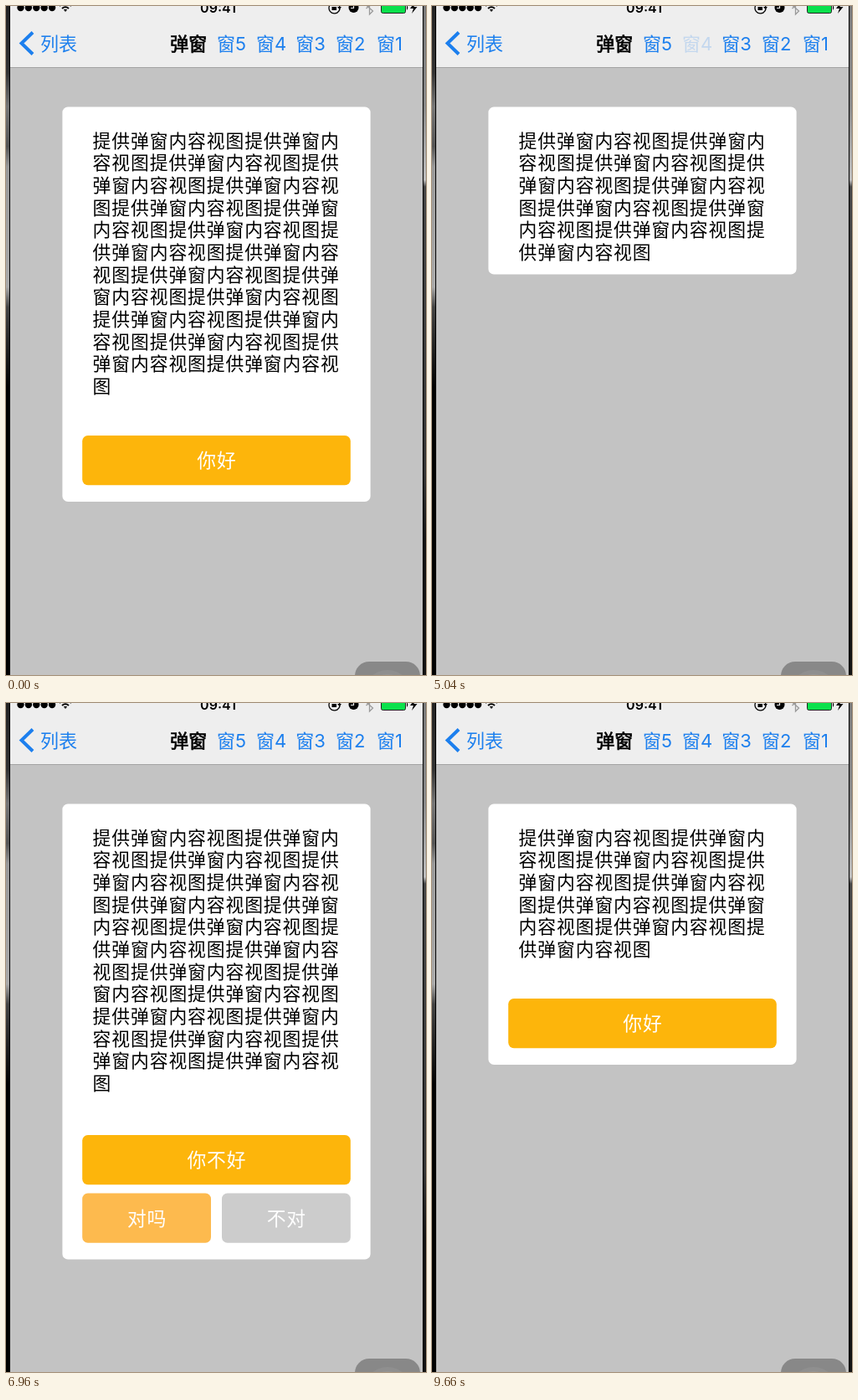
These frames come from a looping animation (502x799 px, 9720 ms). An HTML page:

```html
<!DOCTYPE html>
<html lang="zh-CN">
<head>
<meta charset="utf-8">
<style>
  html, body { margin: 0; width: 100%; height: 100%; overflow: hidden; background: #000; }
  svg { display: block; width: 502px; height: 799px; }
  text { font-family: Inter, 'Noto Sans CJK SC', 'Noto Sans CJK', sans-serif; font-size: 22px; white-space: pre; }
  .body { font-size: 21.8px; letter-spacing: .9px; }
  .label { font-size: 22.8px; letter-spacing: .8px; fill: #fff; text-anchor: middle; }
  .title { stroke: #000; stroke-width: .7px; }
  .blue { fill: #1c7fee; }
</style>
</head>
<body>
<svg viewBox="0 0 502 799">
  <defs>
    <linearGradient id="left" x2="0" y2="1">
      <stop offset="0" stop-color="#222"/><stop offset=".1" stop-color="#333"/>
      <stop offset=".15" stop-color="#777"/><stop offset=".21" stop-color="#555"/>
      <stop offset=".24" stop-color="#999"/><stop offset=".42" stop-color="#aaa"/>
      <stop offset=".45" stop-color="#444"/><stop offset=".54" stop-color="#111"/>
      <stop offset=".57" stop-color="#000"/>
    </linearGradient>
    <linearGradient id="right" x2="0" y2="1">
      <stop offset="0" stop-color="#777"/><stop offset=".15" stop-color="#888"/>
      <stop offset=".26" stop-color="#bbb"/><stop offset=".27" stop-color="#444"/>
      <stop offset=".7" stop-color="#333"/><stop offset=".8" stop-color="#111"/>
    </linearGradient>
  </defs>
  <rect width="4" height="799" fill="url(#left)"/>
  <rect x="499" width="3" height="799" fill="url(#right)"/>
  <rect x="5" width="493" height="799" fill="#c3c3c3"/>
  <rect x="5" width="493" height="73" fill="#eee"/>
  <rect x="5" y="73" width="493" height="1" fill="#a3a3a3"/>

  <path d="M17.5 2H56" stroke="#000" stroke-width="8.4" stroke-linecap="round" stroke-dasharray="0 9.4"/>
  <g fill="none" stroke="#000" stroke-width="2">
    <path d="M64 0Q71-6 78 0M67 3Q71-.5 75 3"/>
    <path d="M71 6.5l-1.5-2h3z" stroke-width="1"/>
    <path d="M398.5 0A6.5 6.5 0 1 1 396-3" stroke-width="1.3"/>
    <path d="M430.5-1l8 7-4 4V-8l4 4-8 7" stroke="#999" stroke-width="1.3"/>
  </g>
  <rect x="389.5" y="1" width="5.5" height="4"/>
  <path d="M396 1h5l-2.5 3z"/>
  <circle cx="415.5" cy="2" r="6"/>
  <path d="M415.5-2V2.5H412" fill="none" stroke="#eee" stroke-width="1.2"/>
  <rect x="448.5" y="-6" width="29" height="14.5" rx="2" fill="#0be14c" stroke="#222"/>
  <path d="M479-1q2.5 3 0 6z"/>
  <path d="M489-5l-6 8h4l-2 6 6.5-8h-4z"/>
  <text x="253.5" y="8" text-anchor="middle" style="font-size:16px;font-weight:600">09:41</text>

  <path d="M32 31.5L18.5 44.5L32 57.5" fill="none" stroke="#1c7fee" stroke-width="4"/>
  <text class="blue" x="41" y="52.7">列表</text>
  <text class="title" x="196.3" y="52.7">弹窗</text>
  <g id="tabs"></g>
  <g id="popups"></g>

  <rect x="417" y="783" width="78" height="78" rx="17" fill="#000" fill-opacity=".3"/>
  <g fill="#fff" fill-opacity=".06">
    <circle cx="456" cy="822" r="29"/><circle cx="456" cy="822" r="24"/>
  </g>
</svg>
<script>
const LOOP = 9720, STEP = 60, RISE = 500, FADE = 450, PRESS = 110;
const REST = 120.5, BELOW = 799;
const ORANGE = '#fdb50b', PALE = '#fdba4e', GRAY = '#ccc';
const phrase = '提供弹窗内容视图';

const make = (parent, tag, attrs, text = '') => {
  const el = document.createElementNS('http://www.w3.org/2000/svg', tag);
  for (const name in attrs) el.setAttribute(name, attrs[name]);
  el.textContent = text;
  return parent.appendChild(el);
};

function button(g, x, y, width, fill, label) {
  make(g, 'rect', { x, y, width, height: 59.2, rx: 6.6, fill });
  make(g, 'text', { class: 'label', x: x + width / 2 + 0.4, y: y + 38.2 }, label);
}
const wide = (g, y, label) => button(g, 91.2, y, 320.6, ORANGE, label);
function pair(g, y, fill, yes, no) {
  button(g, 91.2, y, 153.8, fill, yes);
  button(g, 258, y, 153.8, GRAY, no);
}

function popup(height, repeats, addButtons) {
  const g = make(document.getElementById('popups'), 'g', {});
  make(g, 'rect', { x: 67.4, width: 368.2, height, rx: 6.6, fill: '#fff' });
  if (repeats === 1) {
    make(g, 'text', { class: 'body', x: 251.5, y: 47.5, 'text-anchor': 'middle' }, phrase);
  } else {
    phrase.repeat(repeats).match(/.{1,13}/g).forEach((line, i) =>
      make(g, 'text', { class: 'body', x: 103.6, y: 48.2 + i * 26.65 }, line));
  }
  addButtons(g);
  return g;
}

const popups = {
  5: popup(200, 9, () => {}),
  4: popup(471.5, 18, g => wide(g, 392.5, '你好')),
  3: popup(544, 18, g => { wide(g, 395.5, '你不好'); pair(g, 465, PALE, '对吗', '不对'); }),
  2: popup(242.5, 1, g => pair(g, 164, ORANGE, '确定', '取消')),
  1: popup(311.5, 9, g => wide(g, 232.5, '你好')),
};

const tabs = {};
[443, 394, 346.3, 299, 252].forEach((x, i) => {
  tabs[i + 1] = make(document.getElementById('tabs'), 'text', { class: 'blue', x, y: 52.7 }, '窗' + (i + 1));
});

// Each tap: release time, tab, popup it brings in (0 only clears)
const taps = [
  [1640, 5, 0], [3441, 5, 5], [5110, 4, 4], [6146, 3, 3], [7280, 2, 2], [8735, 1, 1],
];
const smooth = p => p * p * (3 - 2 * p);

function draw(t) {
  let shown = 4, since = -RISE;
  const alpha = {};
  for (const [at, tab, id] of taps) {
    if (t >= at) { shown = id; since = at; }
    if (t >= at - PRESS) alpha[tab] = Math.min(1, 0.2 + 0.8 * Math.max(0, t - at) / FADE);
  }
  for (const id in tabs) {
    tabs[id].setAttribute('opacity', alpha[id] ?? 1);
    popups[id].setAttribute('visibility', id == shown ? 'visible' : 'hidden');
  }
  if (shown) {
    const y = BELOW + (REST - BELOW) * smooth(Math.min(1, (t - since) / RISE));
    popups[shown].setAttribute('transform', `translate(0 ${y})`);
  }
}

const start = performance.now();
function tick() {
  const t = (performance.now() - start) % LOOP;
  draw(Math.floor(t / STEP) * STEP);
  requestAnimationFrame(tick);
}
tick();
</script>
</body>
</html>
```
